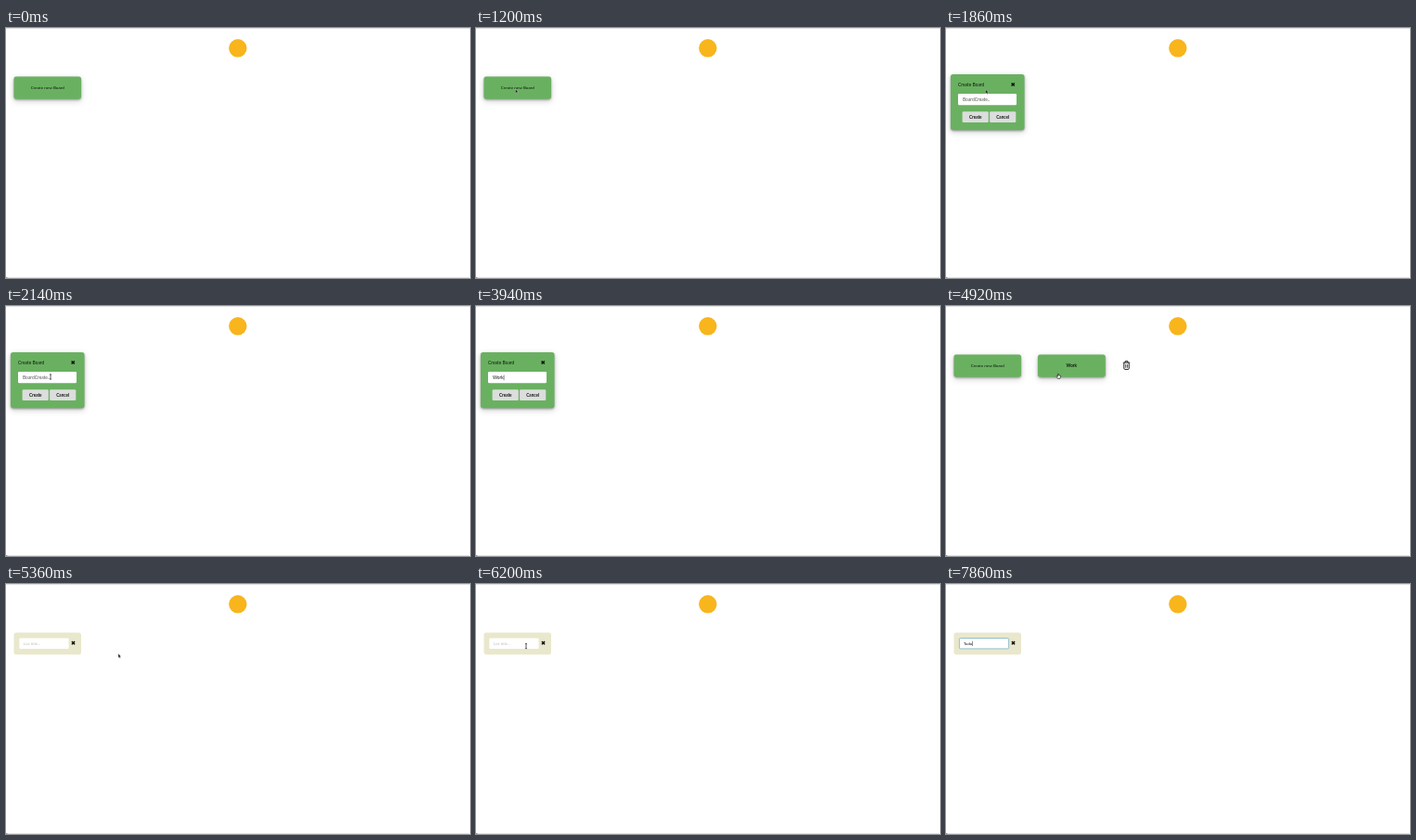
Animation, 500 px wide and 270 px high, one loop 8 s. Source, as an HTML page:

```html
<!DOCTYPE html>
<html lang="en">
<head>
<meta charset="utf-8">
<title>Create a board</title>
<style>
  html, body { margin: 0; width: 100%; height: 100%; overflow: hidden; background: #fff; }
  svg { display: block; width: 100%; height: 100%; }
  text { font-family: Lato, sans-serif; font-size: 4.6px; fill: #101810; }
  .bold { font-weight: 700; }
  .mid { text-anchor: middle; }
  .hint { fill: #bcbcbc; }
  .green { fill: #69b160; filter: drop-shadow(0 1px 1.2px rgba(0,0,0,.32)) drop-shadow(0 2px 3px rgba(0,0,0,.18)); }
  .caret { stroke: #222; stroke-width: .5; }
</style>
</head>
<body>
<svg viewBox="0 0 500 270">
  <defs>
    <path id="cross" d="M-1.6-1.6 1.6 1.6M1.6-1.6-1.6 1.6" stroke="#0c0c0c" stroke-width="1.45"/>
  </defs>
  <rect width="500" height="270" fill="#fff"/>
  <path d="M0 .5H500M1 269.5H499" stroke="#e2e2e2"/>
  <path d="M0 269.5H1.5" stroke="#999"/>
  <circle cx="249.8" cy="21.8" r="9.7" fill="#f8b51c"/>

  <g id="create">
    <rect class="green" x="8.5" y="52.5" width="72.5" height="24.2" rx="2.4"/>
    <text class="mid" x="44.8" y="66.1">Create new Board</text>
  </g>

  <g id="work">
    <rect class="green" x="99" y="52.5" width="72.8" height="24.2" rx="2.4"/>
    <text class="mid bold" x="135.3" y="66.1">Work</text>
  </g>
  <g id="trash" fill="none" stroke="#222" stroke-width="1">
    <path d="M190.8 61.2H198.2M193 61V59.7H196V61M191.8 61.5V67.4Q191.8 68.4 192.8 68.4H196.2Q197.2 68.4 197.2 67.4V61.5"/>
    <path d="M193.7 63V66.8M195.4 63V66.8" stroke-width=".8"/>
  </g>

  <g id="dialog">
    <rect class="green" x="5" y="50" width="79.5" height="60.3" rx="2.7"/>
    <text x="13" y="62.9" style="font-size:4.9px">Create Board</text>
    <use href="#cross" x="72.2" y="61"/>
    <rect x="13" y="71" width="63" height="12.2" rx="1.3" fill="#fff"/>
    <text id="boardText" x="18" y="79.2" style="font-size:4.9px"></text>
    <line id="boardCaret" class="caret" y1="74.5" y2="80.3"/>
    <g fill="#dcdddd">
      <rect x="17.6" y="90.3" width="28.2" height="11.8" rx="1.3"/>
      <rect x="47.1" y="90.3" width="28.2" height="11.8" rx="1.3"/>
    </g>
    <g class="mid bold">
      <text x="31.8" y="97.8">Create</text>
      <text x="61.2" y="97.8">Cancel</text>
    </g>
  </g>

  <g id="list">
    <rect x="8.5" y="52.6" width="72.5" height="23.6" rx="2.6" fill="#e9e8cc"/>
    <rect id="listInput" x="14.4" y="58.5" width="53.2" height="11.4" rx="1" fill="#fff" stroke-width=".8"/>
    <text id="listText" x="19" y="65.9" style="font-size:4.25px"></text>
    <line id="listCaret" class="caret" y1="61.7" y2="67"/>
    <use href="#cross" x="72.5" y="63.6"/>
  </g>

  <g id="cursor">
    <path id="arrow" d="M0 0V4.4L1 3.5 1.7 5 2.4 4.7 1.7 3.2H3Z" fill="#111" stroke="#fff" stroke-width=".3"/>
    <path id="hand" d="M-.6-2V1L-1.5.2-2.1.8-.6 3H1.8L2.4 1.6V0L.4-.4V-2Z" fill="#fff" stroke="#222" stroke-width=".7"/>
    <path id="beam" d="M-1-2.8Q0-2.8 0-2Q0-2.8 1-2.8M0-2V2M-1 2.8Q0 2.8 0 2Q0 2.8 1 2.8" fill="none" stroke="#222" stroke-width=".75"/>
  </g>
</svg>
<script>
const LOOP = 8000;
const el = id => document.getElementById(id);
const show = (id, on) => el(id).style.display = on ? '' : 'none';
const ease = p => p * p * (3 - 2 * p);

// Steps: [time, ...values], eased between neighbours.
const pointer = [
  [360, -2, 59], [800, 42.5, 66], [1820, 42.5, 66], [2140, 48, 76.5],
  [4540, 48, 76.5], [4900, 121, 75.3], [5380, 121, 75.3], [6020, 54, 67]
];
const createScale = [[1360, 1], [1640, 1.1], [3960, 1.1], [4160, 1], [4540, 1], [4680, 1.06], [4840, 1]];
const workScale = [[4960, 1], [5240, 1.1]];
const boardTyping = [[0, ''], [3000, 'W'], [3080, 'Wo'], [3360, 'Wor'], [3620, 'Work']];
const listTyping = [[0, ''], [7200, 'T'], [7540, 'To'], [7660, 'Tod'], [7800, 'Todo']];

function tween(steps, t) {
  const next = steps.findIndex(s => s[0] > t);
  if (next === 0) return steps[0].slice(1);
  if (next < 0) return steps[steps.length - 1].slice(1);
  const a = steps[next - 1], b = steps[next];
  const p = ease((t - a[0]) / (b[0] - a[0]));
  return a.slice(1).map((v, i) => v + (b[i + 1] - v) * p);
}

function scale(id, steps, t, cx) {
  const [k] = tween(steps, t);
  el(id).setAttribute('transform', `translate(${cx} 64.6) scale(${k}) translate(${-cx} -64.6)`);
}

function field(name, typing, hint, focusAt, t) {
  const typed = typing.filter(s => s[0] <= t).pop()[1];
  const text = el(name + 'Text'), caret = el(name + 'Caret');
  text.textContent = typed || hint;
  text.classList.toggle('hint', !typed && name === 'list');
  text.style.opacity = !typed && name === 'board' ? .72 : 1;
  show(name + 'Caret', t >= focusAt);
  const x = +text.getAttribute('x') + (typed ? text.getComputedTextLength() : 0) + .3;
  caret.setAttribute('x1', x);
  caret.setAttribute('x2', x);
}

function draw(t) {
  const dialog = t >= 1840 && t < 3960;
  const list = t >= 5360;
  const boards = t >= 3960 && !list;
  show('create', !dialog && !list);
  show('dialog', dialog);
  show('work', boards);
  show('trash', boards);
  show('list', list);
  scale('create', createScale, t, 44.8);
  scale('work', workScale, t, 135.4);
  if (dialog) field('board', boardTyping, 'BoardCreate..', 2300, t);
  if (list) field('list', listTyping, 'List title...', 6860, t);
  const focus = Math.min(1, Math.max(0, (t - 6860) / 100));
  el('listInput').setAttribute('stroke', `rgba(126,178,198,${focus})`);

  const [x, y] = tween(pointer, t);
  const inBoard = dialog && y > 71;
  const inList = list && x < 67.5;
  const beam = inBoard || inList;
  const hand = boards && x > 99;
  show('cursor', t >= 360 && !(t >= 3000 && t < 4540) && t < 7540);
  show('beam', beam);
  show('hand', hand);
  show('arrow', !beam && !hand);
  el('cursor').setAttribute('transform', `translate(${x} ${y})`);
}

const start = performance.now();
function tick() {
  draw((performance.now() - start) % LOOP);
  requestAnimationFrame(tick);
}
tick();
</script>
</body>
</html>
```
